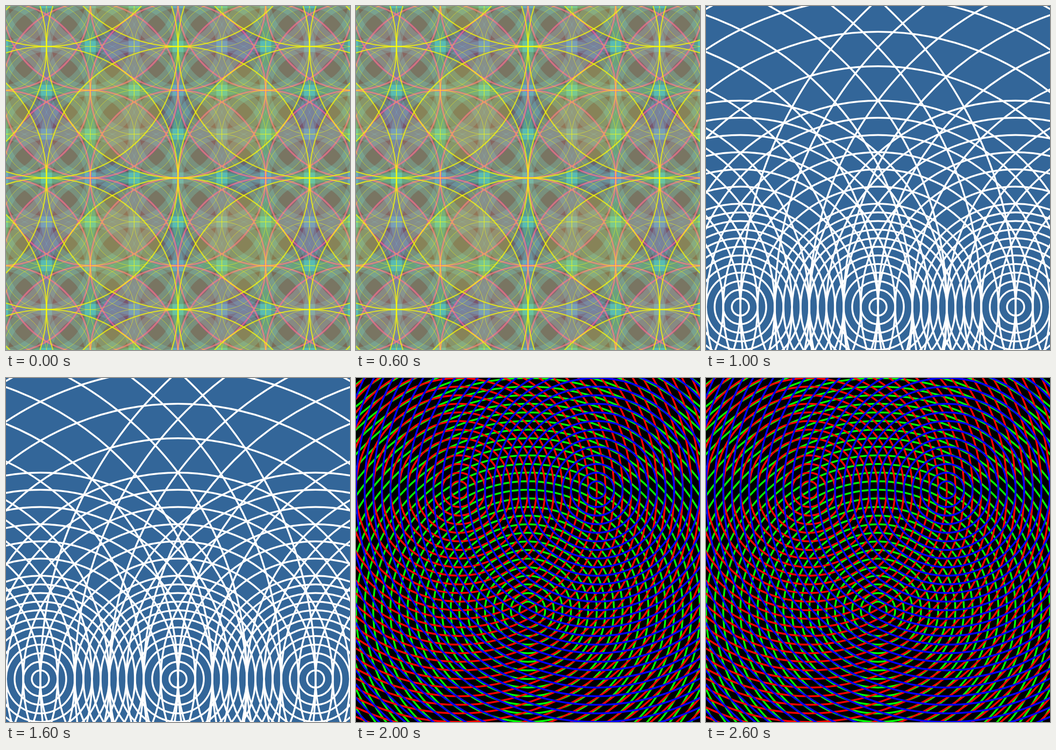
Animation, 748 px wide and 748 px high, one loop 3 s. Source, as an HTML page with a canvas:

```html
<!DOCTYPE html>
<html lang="en">
<head>
<meta charset="utf-8">
<title>Circle patterns</title>
<style>
  html, body { margin: 0; width: 100%; height: 100%; overflow: hidden; background: #000; }
  canvas { position: absolute; left: 0; top: 0; width: 100%; height: 100%; visibility: hidden; }
</style>
</head>
<body>
<script>
const SIZE = 748, MID = SIZE / 2, UNIT = SIZE / 40, HOLD = 1000;

function ring(c, x, y, r, width, stroke, fill) {
  c.beginPath();
  c.arc(x, y, r, 0, 2 * Math.PI);
  if (fill) {
    c.fillStyle = fill;
    c.fill();
  }
  if (stroke) {
    c.lineWidth = width;
    c.strokeStyle = stroke;
    c.stroke();
  }
}

// Square lattice of circles whose radius equals the lattice spacing.
function lattice(c, step, width, stroke, fill) {
  const n = Math.ceil(MID / step) + 1;
  for (let i = -n; i <= n; i++)
    for (let j = -n; j <= n; j++)
      ring(c, MID + i * step, MID + j * step, step, width, stroke, fill);
}

function weave(c) {
  const s = 286 / 3;
  lattice(c, s, s / 4, 'rgba(0,255,255,.3)', 'rgba(0,255,255,.1)');
  lattice(c, 2 * s, 4, 'rgba(255,0,255,.55)', 'rgba(255,0,255,.1)');
  lattice(c, 3 * s, 2.6, 'rgba(255,255,0,.7)', 'rgba(255,255,0,.1)');
  lattice(c, s, 1, 'rgba(255,255,0,.55)');
  lattice(c, 2 * s, 1, 'rgba(255,255,0,.55)');
}

// Rings spread out in three bands; the widest band skips every other centre.
function waves(c) {
  c.fillStyle = '#336699';
  c.fillRect(0, 0, SIZE, SIZE);
  const band = (gap, from, to, step) => {
    for (let x = 20 - 32; x <= 20 + 32; x += gap)
      for (let r = from; r <= to; r += step)
        ring(c, x * UNIT, 35 * UNIT, r * UNIT, 4, '#fff');
  };
  band(16, 1, 12, 1);
  band(16, 14, 24, 2);
  band(32, 28, 48, 4);
}

function moire(c) {
  c.fillStyle = '#000';
  c.fillRect(0, 0, SIZE, SIZE);
  for (const [x, y, color] of [[20, 27, '#0f0'], [12, 13, '#f00'], [28, 13, '#00f']])
    for (let r = 1; r <= 42; r++)
      ring(c, x * UNIT, y * UNIT, r * UNIT, 4, color);
}

const scenes = [weave, waves, moire].map(draw => {
  const el = document.createElement('canvas');
  el.width = el.height = SIZE;
  draw(el.getContext('2d'));
  document.body.append(el);
  return el;
});

const start = performance.now();
function show(now) {
  const k = Math.floor(Math.max(0, now - start) / HOLD) % scenes.length;
  scenes.forEach((el, i) => { el.style.visibility = i === k ? 'visible' : 'hidden'; });
  requestAnimationFrame(show);
}
show(start);
</script>
</body>
</html>
```
